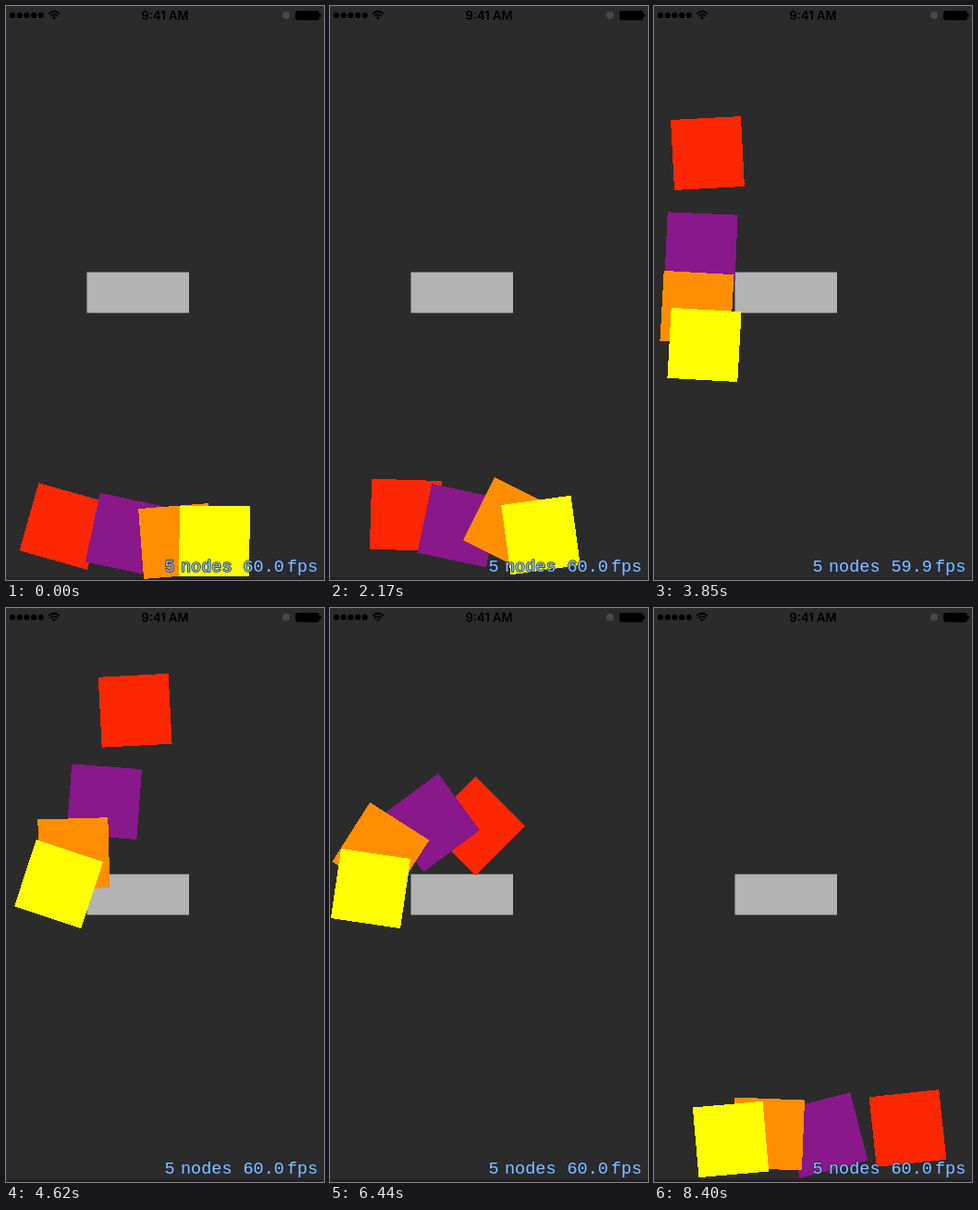
These frames come from a looping animation (344x620 px, 8.47 s). An HTML page:

```html
<!DOCTYPE html>
<html lang="en">
<head>
<meta charset="utf-8">
<title>Linked boxes</title>
<style>
  html, body { margin: 0; width: 100%; height: 100%; overflow: hidden; background: #2b2b2b; }
  svg { display: block; width: 344px; height: 620px; }
  .clock { font: 600 13px Inter, Roboto, sans-serif; text-anchor: middle; }
  .stats { font: 18.5px "Liberation Mono", "DejaVu Sans Mono", monospace; fill: #8fbef8;
           stroke: #1b2e4c; stroke-width: 1.6; paint-order: stroke; stroke-linejoin: round; }
</style>
</head>
<body>
<svg viewBox="0 0 344 620">
  <rect width="344" height="620" fill="#2b2b2b"/>
  <rect y="617" width="344" height="3" fill="#271f23"/>

  <g id="dots"></g>
  <g fill="none" stroke="#000" stroke-width="1.8">
    <path d="M46 8.6Q52 3 58 8.6M48.1 11Q52 7.3 55.9 11"/>
    <path d="M50 12.4Q52 10.8 54 12.4L52 14.6Z" fill="#000" stroke="none"/>
  </g>
  <text class="clock" x="172" y="15">9:41 AM</text>
  <circle cx="303" cy="10" r="4" fill="#484848"/>
  <rect x="313.5" y="5.5" width="25" height="9.5" rx="1.8" stroke="#000" stroke-width=".6"/>
  <path d="M339 8.2Q341 8.4 341 10.2T339 12.2Z"/>

  <rect x="87.5" y="287.5" width="110.5" height="44" fill="#b3b3b3"/>
  <g id="boxes" shape-rendering="crispEdges"></g>
  <g class="stats">
    <text x="171.5" y="611">5</text>
    <text x="189" y="611">nodes</text>
    <text x="256.5" y="611" id="fps">60.0</text>
    <text x="304" y="611">fps</text>
  </g>
</svg>
<script>
const LOOP = 8470, STEP = 70, SIDE = 76, FLOOR = 580;
const GRAB = 2030, TUG_DELAY = 110;

// From the dragged box to the tail; rope is the longest reach to the box before.
const boxes = [
  { color: '#fc2700', rope: Infinity },
  { color: '#89188a', rope: 104 },
  { color: '#fe8e00', rope: 65 },
  { color: '#ffff00', rope: 42.5 },
];

// Each pose holds centre x, centre y and angle per box;
// arc bends the dragged box's way to the next pose up or down.
const poses = [
  { at: 0, boxes: [[61.5, 562, 15.8], [131, 571, 12], [184, 578, -4.5], [225.5, 578, 0.5]] },
  { at: 1330, boxes: [[87, 570, 2.2], [140, 562, 12], [195, 560, 26.5], [228, 571.5, -7.8]] },
  { at: 2800, boxes: [[29.5, 293.5, -2.8], [57, 394, 0], [79.7, 452.5, -1.2], [102, 488, 0]] },
  { at: 3850, arc: -24, boxes: [[58, 159, -3], [51, 262, 2.5], [46.5, 326, 3.2], [54.5, 366, 3.2]] },
  { at: 5390, boxes: [[205, 125, -3], [149.5, 212, 5.3], [95, 242.5, -6.5], [59.5, 263, 31.5]] },
  { at: 6440, arc: -112, boxes: [[157.5, 235.5, 45], [109, 232, -36.5], [54.8, 262.4, 32.5], [44, 303, 8.4]] },
  { at: 8400, boxes: [[274.5, 562, 83.8], [185, 569.5, -104.5], [123.5, 568, 2.3], [83, 574, -5]] },
];

// The chain dangling left of the platform, halfway through its last turn.
const [onPlatform, landed] = poses.slice(-2);
const hanging = {
  at: 7280, arc: 100,
  boxes: boxes.map((_, i) =>
    [54 - 4 * i, 303 + 55 * i, (onPlatform.boxes[i][2] + landed.boxes[i][2]) / 2]),
};
poses.splice(-1, 0, hanging);

// Every box rests after settling until the tug reaches it along the chain.
function track(i) {
  const keys = poses.map(({ at, arc = 0, boxes }) => ({ at, arc: i ? 0 : arc, pose: boxes[i] }));
  keys.splice(2, 0, { ...keys[1], at: GRAB + TUG_DELAY * i });
  return keys;
}

function add(parent, tag, attrs) {
  const node = document.createElementNS('http://www.w3.org/2000/svg', tag);
  for (const name in attrs) node.setAttribute(name, attrs[name]);
  return document.getElementById(parent).appendChild(node);
}

for (let i = 0; i < 5; i++) add('dots', 'circle', { cx: 7 + i * 7.7, cy: 10, r: 3.1 });
boxes.forEach((box, i) => {
  box.keys = track(i);
  box.node = add('boxes', 'rect',
    { x: -SIDE / 2, y: -SIDE / 2, width: SIDE, height: SIDE, fill: box.color });
});

// Shape-preserving cubic: no overshoot past a key.
function sample(keys, t) {
  const last = keys.length - 1;
  if (t >= keys[last].at) return keys[last].pose;
  const i = keys.findIndex(key => key.at > t) - 1;
  const span = keys[i + 1].at - keys[i].at;
  const u = (t - keys[i].at) / span, v = 1 - u;
  const [x, y, angle] = keys[i].pose.map((from, dim) => {
    const rise = k => (keys[k + 1].pose[dim] - keys[k].pose[dim]) / (keys[k + 1].at - keys[k].at);
    const slope = k => {
      if (k === 0 || k === last) return 0;
      const a = rise(k - 1), b = rise(k);
      return a * b > 0 ? 2 * a * b / (a + b) : 0;
    };
    return from * v * v * (1 + 2 * u) + keys[i + 1].pose[dim] * u * u * (1 + 2 * v)
      + span * u * v * (slope(i) * v - slope(i + 1) * u);
  });
  return [x, Math.min(FLOOR, y + keys[i].arc * Math.sin(Math.PI * u)), angle];
}

function draw(t) {
  let leader = null;
  for (const { keys, rope, node } of boxes) {
    let [x, y, angle] = sample(keys, t);
    if (leader) {
      const dx = x - leader.x, dy = y - leader.y;
      const pull = Math.min(1, rope / Math.hypot(dx, dy));
      x = leader.x + dx * pull;
      y = leader.y + dy * pull;
    }
    node.setAttribute('transform', `translate(${x} ${y}) rotate(${angle})`);
    leader = { x, y };
  }
  document.getElementById('fps').textContent = t > 3450 && t < 4440 ? '59.9' : '60.0';
}

const start = performance.now();
function tick() {
  const t = (performance.now() - start) % LOOP;
  draw(Math.floor(t / STEP) * STEP);
  requestAnimationFrame(tick);
}
tick();
</script>
</body>
</html>
```
